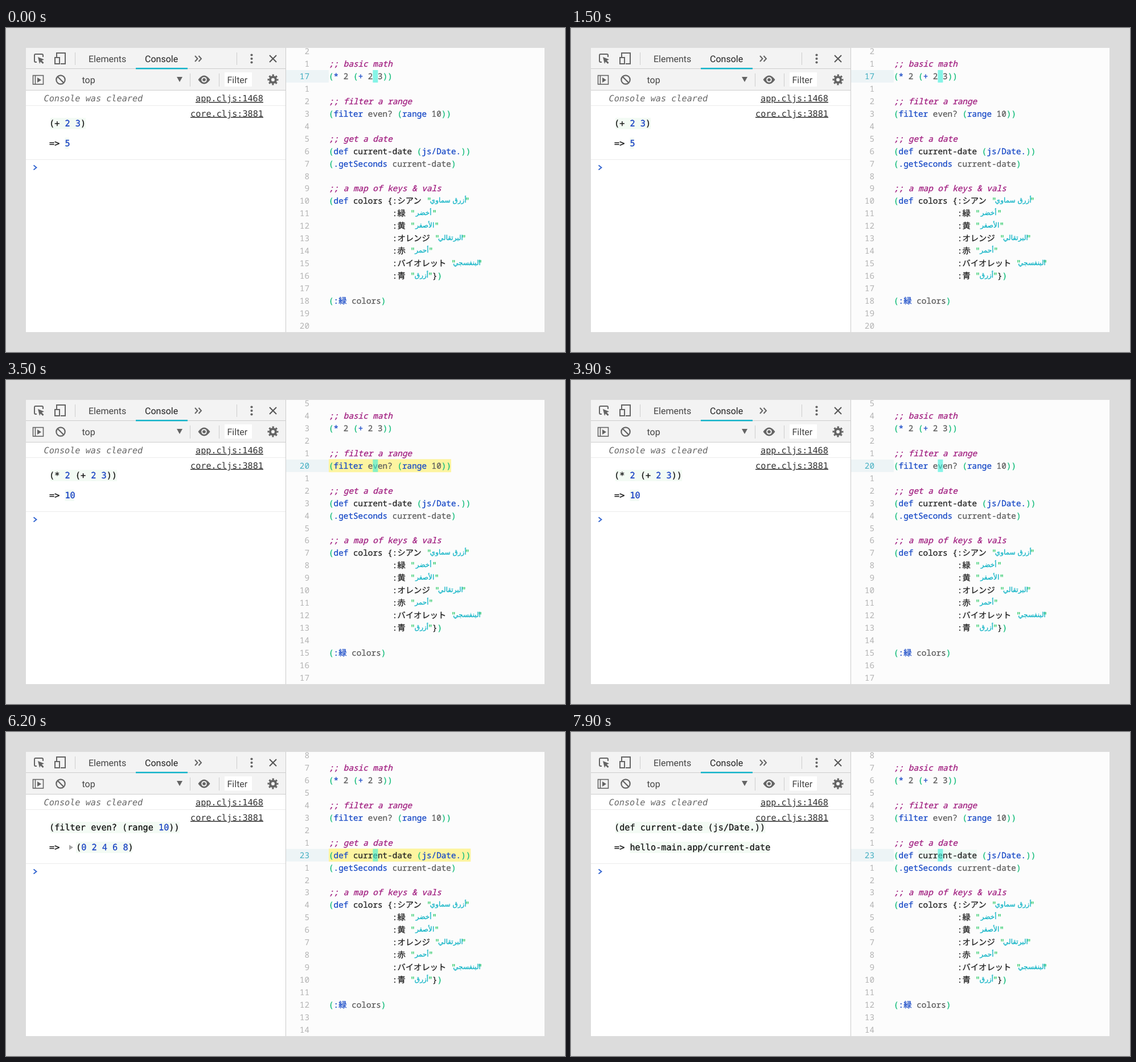
An HTML page for the animation above (8000 ms loop, 982 by 570 pixels).

```html
<!DOCTYPE html>
<html lang="en">
<head>
<meta charset="utf-8">
<title>Editor and console</title>
<style>
html, body { margin: 0; width: 100%; height: 100%; overflow: hidden; background: #dcdcdc; }
svg { display: block; width: 982px; height: 570px; }
text { white-space: pre; text-rendering: geometricPrecision; font-variant-ligatures: none; }
.ui { font: 16px Roboto, sans-serif; fill: #444; }
.ui .active { fill: #222; }
.log { font: 15.2px "DejaVu Sans Mono", monospace; }
.log text { fill: currentColor; color: #161616; }
.log .num { color: #1c45c4; }
.log .link { color: #333; text-decoration: underline; }
.log .cleared { font-style: italic; color: #666; }
.code { font: 14.33px "Noto Sans Mono", "Noto Sans CJK JP", monospace; }
.log tspan, #log text, .code tspan, .arabic { fill: currentColor; stroke: currentColor; stroke-width: .3px; }
.arabic { font: 12px "DejaVu Sans", sans-serif; color: #12b4c6; text-anchor: middle; }
.comment { font-style: italic; color: #a01c7f; }
.gutter { fill: #b3b3b3; text-anchor: end; }
.gutter .here { fill: #42aec1; }
.paren { color: #14bd7b; }
.fn { color: #1648c6; }
.plain { color: #5c5c5c; }
.dark { color: #222; }
.quote { color: #25c862; }
.line { fill: none; stroke: #646464; stroke-width: 2; }
.thin { fill: none; stroke: #cdcdcd; }
</style>
</head>
<body>
<svg viewBox="0 0 982 570">
  <rect x="35" y="35" width="456" height="500" fill="#fff"/>
  <rect x="35" y="35" width="456" height="74" fill="#f3f3f3"/>
  <rect x="491" y="35" width="455" height="500" fill="#fcfcfc"/>
  <path class="thin" d="M35 71.5H491M35 109.5H491M121.5 43V65M405.5 43V65M323.5 80V103M374.5 80V103M491.5 35V535"/>
  <path class="thin" style="stroke:#ebebeb" d="M35 136.5H491M35 231.5H491"/>
  <rect x="228" y="70" width="91" height="2.5" fill="#12b3c9"/>

  <g class="ui">
    <text x="145" y="60">Elements</text>
    <text class="active" x="244" y="60">Console</text>
    <text x="133.5" y="97">top</text>
    <rect x="384" y="78" width="48" height="25" fill="#fff"/>
    <text x="388.5" y="97">Filter</text>
  </g>

  <g class="line">
    <path d="M54 60H52Q50 60 50 58V48Q50 46 52 46H63Q65 46 65 48V51"/>
    <path d="M56 51L67 55.5L62.8 57.2L66.5 61L64.5 63L60.7 59.2L59 63Z" fill="#646464" stroke="none"/>
    <path d="M89 51V44H104V63H96"/>
    <rect x="86" y="52" width="8" height="11"/>
    <path d="M332 49L336.5 54L332 59M338.5 49L343 54L338.5 59"/>
    <path d="M463 48L475 60M475 48L463 60" stroke="#555"/>
    <rect x="47.5" y="83.5" width="18" height="15.5" stroke-width="1.6"/>
    <path d="M51.5 83V99" stroke-width="1.6"/>
    <path d="M55 87V96L62 91.5Z" fill="#646464" stroke="none"/>
    <circle cx="96" cy="91" r="7.7" stroke-width="2.2"/>
    <path d="M90.5 85.5L101.5 96.5" stroke-width="2.2"/>
    <path d="M48.5 241.5L53.5 245.5L48.5 249.5" stroke="#2f62d0" stroke-width="1.8"/>
    <circle cx="469" cy="91" r="8" stroke-width="3" stroke-dasharray="3.1416" stroke-dashoffset="1.57"/>
    <circle cx="469" cy="91" r="5" stroke-width="4"/>
  </g>
  <g fill="#646464">
    <circle cx="431.5" cy="47.5" r="2.1"/><circle cx="431.5" cy="54" r="2.1"/><circle cx="431.5" cy="60.5" r="2.1"/>
    <path d="M300 86H310L305 95Z"/>
    <path d="M337.5 91Q348 76 358.5 91Q348 106 337.5 91Z"/>
    <circle cx="348" cy="91" r="4.8" fill="#f3f3f3"/><circle cx="348" cy="91" r="2.8"/>
  </g>

  <g class="log">
    <text class="cleared" x="66.5" y="129">Console was cleared</text>
    <text class="link" x="333" y="129">app.cljs:1468</text>
    <text class="link" x="324" y="155.5">core.cljs:3881</text>
    <g id="log"></g>
  </g>

  <rect id="row" x="492" width="75" height="22" fill="#edf4f6"/>
  <rect id="match" x="610" y="207" width="103" height="21" fill="#effaf5"/>
  <rect id="flash" x="567" height="23" fill="#fdf4a0"/>
  <g id="gutter" class="code gutter"></g>
  <g id="code" class="code"></g>
  <rect id="cursor" width="9" height="22" fill="#40f0dc" fill-opacity=".62"/>
</svg>
<script>
const LOOP = 8000, CHAR = 8.6, LEFT = 567, PITCH = 21.95, ROWS = 23, FIRST = 15;
const $ = id => document.getElementById(id);
const mid = row => 41 + PITCH * row;
const base = row => mid(row) + 5;

// Markup: a style letter, then the text up to the next "|".
const STYLES = { c: 'comment', p: 'paren', f: 'fn', n: 'plain', d: 'dark', q: 'quote' };
const spans = s => s.split('|').map(p => `<tspan class="${STYLES[p[0]]}">${p.slice(1)}</tspan>`).join('');
const text = (x, row, s) => `<text x="${x}" y="${base(row)}">${spans(s)}</text>`;

const lines = {
  1: 'c;; basic math',
  2: 'p(|f*|n 2 |p(|f+|n 2 3|p))',
  4: 'c;; filter a range',
  5: 'p(|ffilter|n even? |p(|frange|n 10|p))',
  7: 'c;; get a date',
  8: 'p(|fdef|d current-date |p(|fjs/Date.|p))',
  9: 'p(|f.getSeconds|n current-date|p)',
  11: 'c;; a map of keys &amp; vals',
  12: 'p(|fdef|d colors {',
  20: 'p(|f:緑|n colors|p)'
};

// Key, value and the x of the closing quote, from row 12 down.
const colors = [
  ['シアン', 'أزرق سماوي', 806],
  ['緑', 'أخضر', 748.5],
  ['黄', 'الأصفر', 752.5],
  ['オレンジ', 'البرتقالي', 800],
  ['赤', 'أحمر', 742],
  ['バイオレット', 'البنفسجي', 828.5],
  ['青', 'أزرق', 741]
];

let code = Object.entries(lines).map(([row, s]) => text(LEFT, +row, s)).join('');
colors.forEach(([key, value, end], i) => {
  const row = 12 + i, x = LEFT + 13 * CHAR;
  const open = x + 2 * CHAR + key.length * 14.33;
  code += text(x, row, 'd:' + key) + text(open, row, 'q"') + text(end, row, 'q"') +
    `<text class="arabic" x="${(open + CHAR + end) / 2}" y="${base(row) - 2}">${value}</text>`;
});
$('code').innerHTML = code + text(749, 18, 'd}|p)');

const logs = [
  [0, '(+ 2 3)', '5'],
  [2200, '(* 2 (+ 2 3))', '10'],
  [4600, '(filter even? (range 10))', '(0 2 4 6 8)'],
  [7300, '(def current-date (js/Date.))', 'hello-main.app/current-date']
];
const moves = [[0, 2], [2300, 3], [2500, 4], [2900, 5], [5100, 6], [5300, 7], [5500, 8]];
// Start, end, row and length of each evaluated form.
const flashes = [[1000, 1500, 2, 13], [3300, 3900, 5, 25], [6000, 6600, 8, 29]];

const latest = (list, t) => list.filter(e => e[0] <= t).pop();
const digits = s => s.replace(/\d+/g, '<tspan class="num">$&</tspan>');

function drawLog([, form, result]) {
  const list = result[0] === '(';
  const x = list ? 123 : 103.45;
  const tint = (x, y, s) => `<rect x="${x}" y="${y}" width="${s.length * 9.15 - 2}" height="20" fill="#f3fbf4"/>`;
  $('log').innerHTML = tint(78, 158, form) + tint(x, 193, result) +
    `<text x="76" y="173">${digits(form)}</text><text x="76" y="208">=&gt;</text>` +
    (list ? '<path d="M111 198.5V207.5L118 203Z" fill="#a5a5a5"/>' : '') +
    `<text x="${x}" y="208">${digits(result)}</text>`;
}

function drawCursor([, here]) {
  let numbers = '';
  for (let row = 0; row < ROWS; row++) {
    const n = row === here ? FIRST + row : Math.abs(row - here);
    numbers += `<text x="533" y="${base(row)}"${row === here ? ' class="here"' : ''}>${n}</text>`;
  }
  $('gutter').innerHTML = numbers;
  const top = mid(here) - 10.9;
  $('row').setAttribute('y', top);
  $('cursor').setAttribute('y', top);
  $('cursor').setAttribute('x', LEFT + (lines[here] ? 9 * CHAR : 0));
}

let log, move;
function frame() {
  const t = Math.floor(performance.now() % LOOP / 100) * 100;
  const nextLog = latest(logs, t), nextMove = latest(moves, t);
  if (nextLog !== log) drawLog(log = nextLog);
  if (nextMove !== move) drawCursor(move = nextMove);

  const flash = flashes.find(([start, end]) => t >= start && t < end);
  $('flash').setAttribute('opacity', flash ? Math.min(1, (flash[1] - t) / 400) : 0);
  if (flash) {
    $('flash').setAttribute('y', mid(flash[2]) - 11.5);
    $('flash').setAttribute('width', flash[3] * CHAR);
  }
  $('match').setAttribute('opacity', t >= 7900 ? 1 : 0);
  requestAnimationFrame(frame);
}
frame();
</script>
</body>
</html>
```
